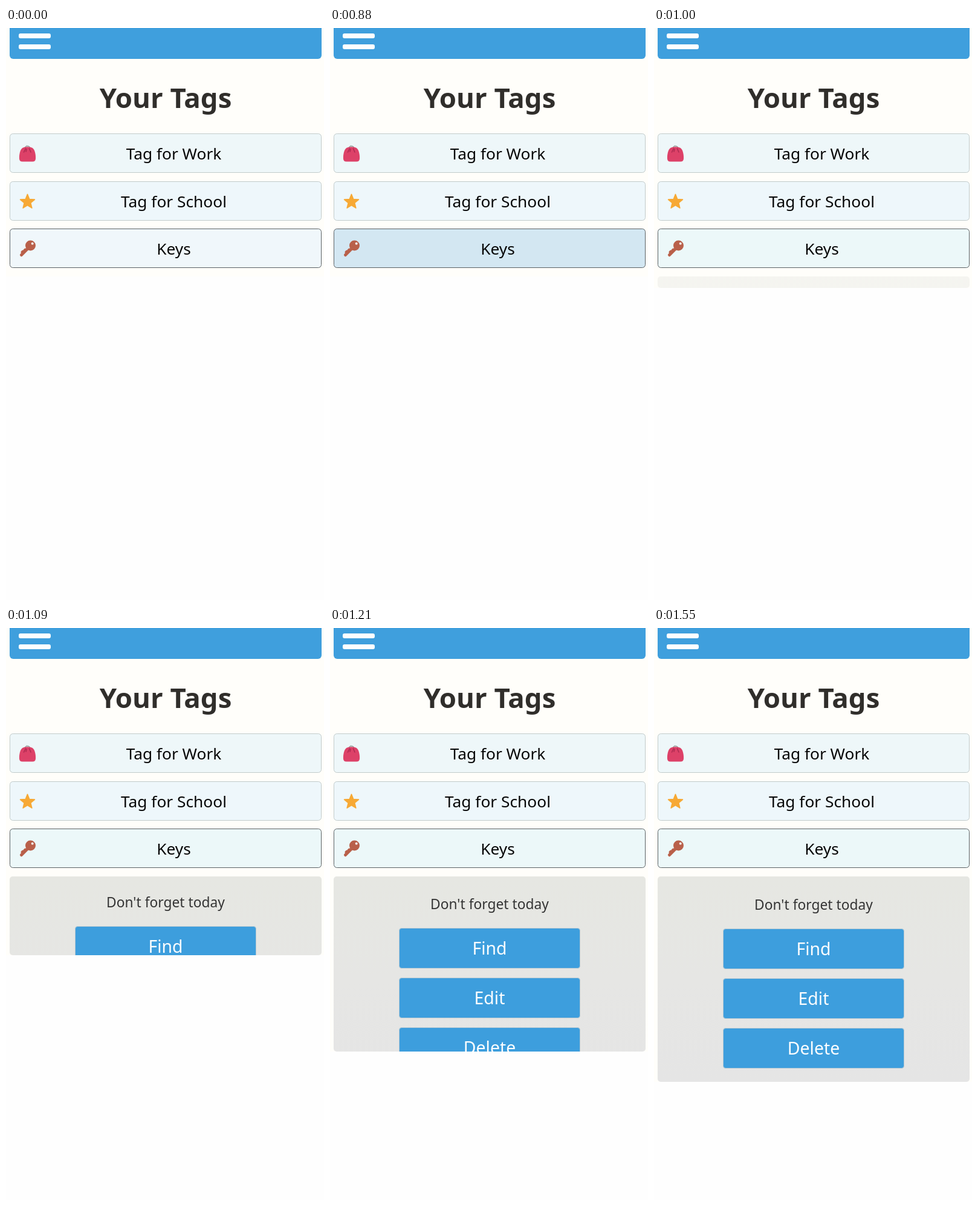
An HTML page that plays this animation: 526 by 944 pixels, repeating every 2.39 s.

```html
<!DOCTYPE html>
<html lang="en">
<head>
<meta charset="utf-8">
<title>Your Tags</title>
<style>
  html, body { margin: 0; width: 100%; height: 100%; overflow: hidden; background: #fefefe; }
  svg { display: block; width: 526px; height: 944px; }
  text { font-family: "Noto Sans", "Open Sans", sans-serif; text-anchor: middle; }
  .title { font-size: 45.6px; font-weight: 700; fill: #302e2b; }
  .tag { font-size: 26.3px; fill: #060606; }
  .note { font-size: 22.8px; fill: #343434; }
  .action { font-size: 28.4px; fill: #fdfeff; }
</style>
</head>
<body>
<svg viewBox="0 0 526 944">
  <defs>
    <linearGradient id="shade" x1="0" y1="0" x2="0" y2="1">
      <stop offset="0" stop-color="#e6e7e2"/>
      <stop offset=".5" stop-color="#e6e6e4"/>
      <stop offset="1" stop-color="#e5e5e5"/>
    </linearGradient>
    <clipPath id="clip"><rect id="window" x="6" y="410" width="516" rx="5"/></clipPath>
  </defs>

  <rect id="page" width="526" height="400" fill="#fffefa"/>
  <rect x="6" y="-10" width="516" height="61" rx="6" fill="#3f9fdd"/>
  <g fill="#fefefe">
    <rect x="21" y="9" width="53" height="8" rx="3"/>
    <rect x="21" y="27" width="53" height="8" rx="3"/>
  </g>
  <text class="title" x="264" y="132">Your Tags</text>

  <g id="tags"></g>

  <!-- purse -->
  <path d="M31 197.5Q35.500 192 40 197.500" fill="none" stroke="#8f9a96" stroke-width="1.6"/>
  <circle cx="34.500" cy="195" r="1.500" fill="#a9b5b0"/>
  <path d="M28 197.500Q35.500 195 43 197.500C48 200 49.500 210 49 216Q48.500 220.500 44 220.500H27Q22.500 220.500 22 216C21.500 210 23 200 28 197.500Z" fill="#dd4168"/>
  <path d="M32.500 199L29.500 205M34 200L33 204M38.500 199L41 205" fill="none" stroke="#ac2a50" stroke-width="1.500" stroke-linecap="round"/>

  <!-- star -->
  <path id="star" fill="#f7a935" stroke="#f7a935" stroke-width="1.500" stroke-linejoin="round"/>

  <!-- key -->
  <g stroke="#b9604a" fill="none" stroke-linecap="round">
    <path d="M36 364L25.500 374.500" stroke-width="5"/>
    <path d="M28 368.500L26.500 370M32 365.500L30.500 367" stroke-width="4"/>
  </g>
  <circle cx="40.500" cy="359" r="8.500" fill="#b9604a"/>
  <circle cx="43.700" cy="355.700" r="2" fill="#f5f3f3"/>

  <g id="panel" clip-path="url(#clip)">
    <rect x="6" y="410" width="516" height="339" fill="url(#shade)"/>
    <text id="note" class="note" x="264">Don't forget today</text>
    <g id="actions"></g>
  </g>
</svg>

<script>
const LOOP = 2390, TOP = 410, FULL = 339, PAD = 6;
const $ = id => document.getElementById(id);

function add(parent, name, attrs, label) {
  const el = document.createElementNS("http://www.w3.org/2000/svg", name);
  for (const key in attrs) el.setAttribute(key, attrs[key]);
  if (label) el.textContent = label;
  return parent.appendChild(el);
}

function addTag(label, y, fill, stroke) {
  const box = add($("tags"), "rect",
    { x: 6.5, y: y + .5, width: 515, height: 64, rx: 5, fill, stroke });
  add($("tags"), "text", { class: "tag", x: 277.5, y: y + 43 }, label);
  return box;
}

addTag("Tag for Work", 174, "#eef7f9", "#c1cbcb");
addTag("Tag for School", 253, "#eef7fb", "#c1cbcb");
const keys = addTag("Keys", 331, "#f0f7fb", "#5b6266");

const actions = ["Find", "Edit", "Delete"].map((label, i) => {
  const group = add($("actions"), "g", {});
  add(group, "rect", { x: 114.5, y: .5, width: 299, height: 66, rx: 4, fill: "#3d9edd", stroke: "#b4c8d3" });
  add(group, "text", { class: "action", x: 264, y: 44 }, label);
  return { group, y: 495.9 + 81.85 * i };
});

const star = Array.from({ length: 10 }, (_, i) => {
  const r = i % 2 ? 5.6 : 12.6, a = Math.PI * (i / 5 - .5);
  return (35.5 + r * Math.cos(a)).toFixed(2) + " " + (287 + r * Math.sin(a)).toFixed(2);
});
$("star").setAttribute("d", "M" + star.join("L") + "Z");

// [ms, phase] of the unfolding panel, before easing
const SLIDE = [[950, 0], [1000, .152], [1150, .608], [1270, .89], [1330, 1]];

function lerpTable(table, t) {
  if (t <= table[0][0]) return table[0][1];
  for (let i = 1; i < table.length; i++) {
    const [t0, v0] = table[i - 1], [t1, v1] = table[i];
    if (t <= t1) return v0 + (v1 - v0) * (t - t0) / (t1 - t0);
  }
  return table[table.length - 1][1];
}

function draw(time) {
  let t = time % LOOP;
  if (t >= 850) t = 850 + 30 * Math.floor((t - 850) / 30);
  const open = .5 - Math.cos(Math.PI * lerpTable(SLIDE, t)) / 2;
  const height = Math.round(FULL * open);
  const shift = PAD * (open - 1);

  keys.setAttribute("fill", t < 850 ? "#f0f7fb" : t < 970 ? "#d3e7f2" : "#ecf8f9");
  $("window").setAttribute("height", height);
  $("page").setAttribute("height", Math.max(400, TOP + height));
  $("panel").setAttribute("opacity", lerpTable([[970, .3], [1000, .42], [1060, 1]], t));
  $("note").setAttribute("y", Math.round(465 + shift));
  for (const { group, y } of actions)
    group.setAttribute("transform", `translate(0 ${Math.round(y + shift)})`);
}

const start = performance.now();
function tick() {
  draw(performance.now() - start);
  requestAnimationFrame(tick);
}
tick();
</script>
</body>
</html>
```
